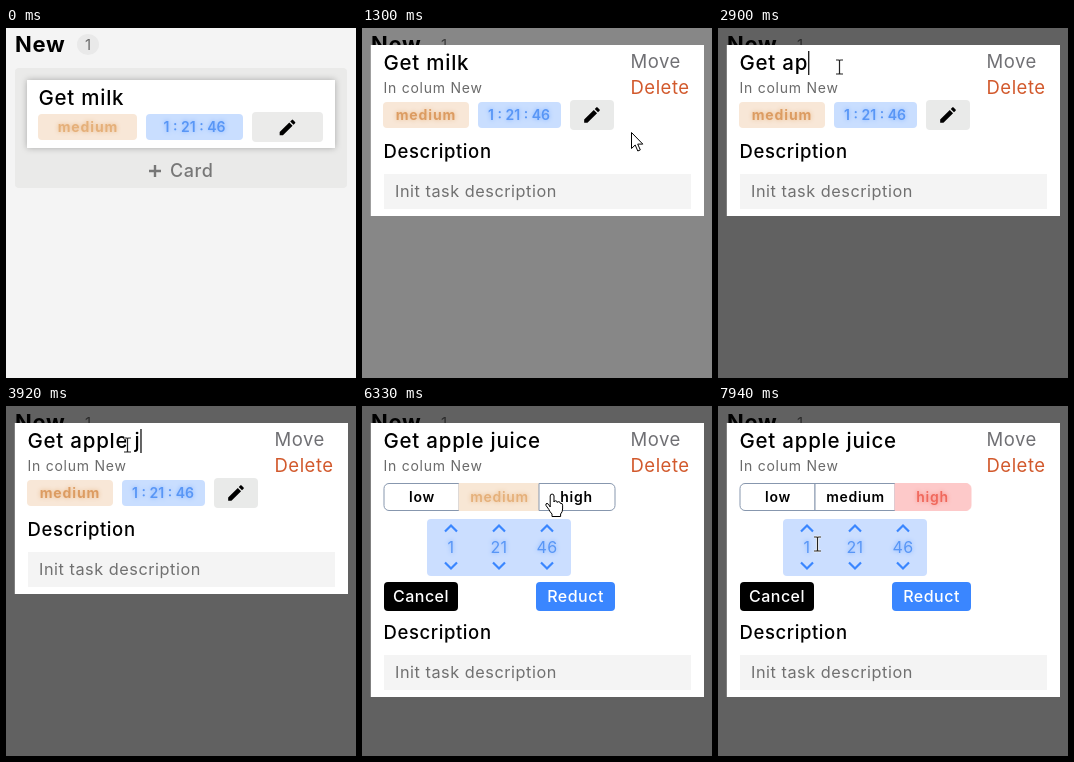
Write an HTML page that moves like this. It is 350x350 px and loops after 8000 ms.

```html
<!DOCTYPE html>
<html lang="en">
<head>
<meta charset="utf-8">
<title>Task card</title>
<style>
  html, body { margin: 0; width: 100%; height: 100%; overflow: hidden; background: #f4f4f4; }
  svg { display: block; width: 100vw; height: 100vh; }
  text { font-family: Inter, "Open Sans", sans-serif; white-space: pre; }
  .h { font-size: 20.5px; font-weight: 500; letter-spacing: .75px; }
  .tag { font-size: 14px; font-weight: 700; letter-spacing: .9px; text-anchor: middle; }
  .time { font-size: 14px; font-weight: 600; text-anchor: middle; }
  .seg { font-size: 14px; font-weight: 600; letter-spacing: .7px; text-anchor: middle; }
  .link { font-size: 18.5px; letter-spacing: .5px; }
  .btn { font-size: 16px; font-weight: 500; letter-spacing: .5px; text-anchor: middle; fill: #fff; }
  .num { font-size: 16px; letter-spacing: .3px; text-anchor: middle; }
  .orange { fill: #e5b07a; filter: drop-shadow(0 0 2px #e9b98a); }
  .deep { fill: #dc9c62; filter: drop-shadow(0 0 2px #e9b98a); }
  .blue { fill: #5896f6; filter: drop-shadow(0 0 2px #7fb0ff); }
  .red { fill: #f0685c; filter: drop-shadow(0 0 2px #f58d84); }
  .card { filter: drop-shadow(0 0 3px rgba(0, 0, 0, .28)); }
  .chev { fill: none; stroke: #3a86ff; stroke-width: 2.2; }
  #ring { mix-blend-mode: multiply; }
</style>
</head>
<body>
<svg viewBox="0 0 350 350">
  <defs>
    <path id="pencil" transform="scale(.87) translate(-12 -12)" d="M3 17.25V21h3.75L17.81 9.94l-3.75-3.75zM20.71 7.04a1 1 0 0 0 0-1.41l-2.34-2.34a1 1 0 0 0-1.41 0l-1.83 1.83 3.75 3.75z"/>
    <path id="up" d="M-6 3.5L0-2.5L6 3.5"/>
    <path id="bar" d="M-3.5-7H-1Q0-7 0-6Q0-7 1-7H3.5M0-6V6M-3.5 7H-1Q0 7 0 6Q0 7 1 7H3.5"/>
  </defs>

  <rect width="350" height="350" fill="#f4f4f4"/>
  <text x="9" y="24" font-size="22" font-weight="700" letter-spacing=".7">New</text>
  <ellipse id="badge" cx="82" cy="16.5" rx="11" ry="10.5" fill="#e9e9e9"/>
  <text x="82" y="22" font-size="15" text-anchor="middle" fill="#6c6c6c">1</text>

  <g id="board">
    <rect x="9" y="40" width="332" height="120" rx="4" fill="#eaeae9"/>
    <rect class="card" x="21" y="52" width="308" height="68" fill="#fff"/>
    <text class="h" x="32.5" y="77">Get milk</text>
    <rect x="32" y="86" width="99" height="26" rx="4" fill="#f8e7d7"/>
    <text class="tag orange" x="82" y="104">medium</text>
    <rect x="140" y="86" width="97" height="26" rx="4" fill="#c9deff"/>
    <text class="time blue" x="188.5" y="104">1 : 21 : 46</text>
    <rect x="246" y="84" width="71" height="30" rx="4" fill="#ebebea"/>
    <use href="#pencil" transform="translate(281.5 99.5)"/>
    <path d="M143 143h12M149 137v12" stroke="#777" stroke-width="2.4"/>
    <text x="164" y="149" font-size="18" font-weight="500" letter-spacing=".6" fill="#777">Card</text>
  </g>

  <rect id="shade" width="350" height="350"/>

  <g id="modal">
    <rect id="sheet" x="8.8" y="17" width="333.2" height="171" fill="#fff"/>
    <rect id="mark" y="23" height="24" fill="#3390ff"/>
    <text id="title" class="h" x="21.5" y="42"><tspan>Get </tspan><tspan id="word">milk</tspan></text>
    <text x="21.5" y="65" font-size="14" letter-spacing=".75" fill="#6a6a6a">In colum New</text>
    <text class="link" x="268.5" y="40" fill="#707074">Move</text>
    <text class="link" x="268.5" y="66" fill="#d2592c">Delete</text>

    <g id="tags">
      <rect x="21" y="74" width="86" height="26" rx="4" fill="#f8e7d7"/>
      <text class="tag deep" x="64" y="92">medium</text>
      <rect x="116" y="74" width="83" height="26" rx="4" fill="#c9deff"/>
      <text class="time blue" x="157" y="92">1 : 21 : 46</text>
      <rect x="208" y="72" width="44" height="30" rx="4" fill="#e9eae9"/>
      <use href="#pencil" transform="translate(230 87)"/>
    </g>

    <g id="editor">
      <path d="M97 77.5H27a5 5 0 0 0-5 5v17a5 5 0 0 0 5 5H97z" fill="#fff" stroke="#8797ae"/>
      <path id="midBox" d="M97 77.5h80v27H97z"/>
      <path id="highBox" d="M177 77.5h71a5 5 0 0 1 5 5v17a5 5 0 0 1-5 5H177z"/>
      <text class="seg" x="60" y="96">low</text>
      <text id="mid" x="137.5" y="96">medium</text>
      <text id="high" x="214.5" y="96">high</text>
      <rect x="65" y="113" width="144" height="57" rx="4" fill="#cbdeff"/>
      <g id="nums"></g>
      <rect x="22" y="176" width="74" height="29" rx="4"/>
      <text class="btn" x="59" y="196">Cancel</text>
      <rect x="174" y="176" width="79" height="29" rx="4" fill="#3a86ff"/>
      <text class="btn" x="213.5" y="196">Reduct</text>
    </g>

    <g id="desc">
      <text x="21.5" y="130" font-size="18.5" font-weight="500" letter-spacing=".6">Description</text>
      <rect x="22" y="146" width="307" height="35" fill="#f4f4f4"/>
      <text x="33" y="169" font-size="16.3" letter-spacing=".53" fill="#707070">Init task description</text>
    </g>
    <rect id="caret" width="1.2"/>
  </g>

  <circle id="ring" r="11.5" fill="#fff64e"/>
  <g id="cursor">
    <path id="arrow" d="M.5.5v16l3.7-3.5 2.6 6 2.5-1.1-2.6-5.8h5.1z" fill="#fff" stroke="#000"/>
    <path id="hand" d="M-1.8 13V2a1.9 1.9 0 0 1 3.8 0V8q0-1.4 1.7-1.2 1.6.2 1.6 1.7 0-1 1.5-.8 1.6.2 1.6 1.7 2.2-.6 2.2 1.8V15q0 3-2 5v2.5H0V20q-2-2-3.2-4.6L-6 11.5q-.6-2 1-2.2 1.2 0 3.2 3.7z" fill="#fff" stroke="#000" stroke-linejoin="round"/>
    <g id="beam" fill="none">
      <use href="#bar" stroke="#fff" stroke-width="2.6"/>
      <use href="#bar" stroke="#222" stroke-width="1.2"/>
    </g>
  </g>
</svg>
<script>
  const $ = id => document.getElementById(id);
  const set = (el, attrs) => { for (const k in attrs) el.setAttribute(k, attrs[k]); };
  const show = (id, on) => { $(id).style.display = on ? '' : 'none'; };
  const within = (t, a, b) => t >= a && t < b;
  const clamp = v => Math.max(0, Math.min(1, v));
  const ease = v => v * v * (3 - 2 * v);

  const LOOP = 8000, OPEN = 1100, EDIT = 5730, PICK = 6430;
  const TYPED = 'apple juice';
  const KEYS = [2800, 2900, 3000, 3220, 3320, 3520, 3920, 4020, 4320, 4520, 4620];

  // Pointer stops: time, x, y
  const PATH = [
    [180, 281, 335], [560, 256, 160], [800, 269, 104], [1350, 269, 104],
    [1700, 121.5, 39], [5180, 121.5, 39], [5560, 230, 92], [5880, 230, 92],
    [6300, 190, 88], [6580, 190, 88], [6780, 201, 112], [7130, 99.5, 138]
  ];
  // Clicks: start, end, x, y
  const CLICKS = [
    [1000, 1100, 269, 104], [1900, 2100, 120.5, 38.5], [5630, 5830, 229, 92],
    [6430, 6530, 190, 88], [7330, 7430, 97.5, 138]
  ];

  $('nums').innerHTML = [[89, 1], [137, 21], [185, 46]].map(([x, n]) => `
    <use href="#up" class="chev" transform="translate(${x} 122)"/>
    <text class="num blue" x="${x}" y="147">${n}</text>
    <use href="#up" class="chev" transform="translate(${x} 160) scale(1 -1)"/>`).join('');

  function pointer(t) {
    let i = 0;
    while (i < PATH.length - 1 && t >= PATH[i + 1][0]) i++;
    const a = PATH[i], b = PATH[i + 1] || a;
    const p = b === a ? 0 : ease(clamp((t - a[0]) / (b[0] - a[0])));
    return [a[1] + (b[1] - a[1]) * p, a[2] + (b[2] - a[2]) * p];
  }

  function pointerKind(t, x, y) {
    if (t < OPEN) return y < 160 ? 'hand' : 'arrow';
    if (x < 260 && y > 20 && y < 48) return 'beam';
    if (t < EDIT) return x > 207 && x < 253 && y > 71 && y < 103 ? 'hand' : 'arrow';
    if (y > 76 && y < 106) return 'hand';
    return y > 130 && y < 152 && x < 104 ? 'beam' : 'arrow';
  }

  function segment(name, on, tint, fill) {
    set($(name + 'Box'), { fill: on ? fill : '#fff', stroke: on ? fill : '#8797ae' });
    $(name).setAttribute('class', on ? 'seg ' + tint : 'seg');
  }

  function drawTitle(t) {
    const count = KEYS.filter(k => t >= k).length;
    const word = count ? TYPED.slice(0, count) : 'milk';
    const selected = within(t, 2000, KEYS[0]);
    if ($('word').textContent !== word) $('word').textContent = word;
    $('word').setAttribute('fill', selected ? '#fff' : '#000');
    show('mark', selected);
    const end = 21.5 + $('title').getComputedTextLength();
    if (selected) {
      const x = $('title').getStartPositionOfChar(4).x;
      set($('mark'), { x, width: end - x });
    }
    const typing = within(t, 1900, 2000) || within(t, KEYS[0], 5120);
    const counting = within(t, 7430, 7940);
    show('caret', typing || counting);
    set($('caret'), counting ? { x: 90.8, y: 132, height: 19 } : { x: end, y: 23, height: 24 });
  }

  function draw(t) {
    const open = t >= OPEN, edit = t >= EDIT;
    show('board', !open);
    show('badge', !open);
    show('modal', open);
    set($('shade'), { opacity: .6 * clamp((t - OPEN) / 270) });

    if (open) {
      show('tags', !edit);
      show('editor', edit);
      set($('sheet'), { height: edit ? 274 : 171 });
      set($('desc'), { transform: `translate(0 ${edit ? 103 : 0})` });
      segment('mid', t < PICK, 'orange', '#f8e7d5');
      segment('high', t >= PICK, 'red', '#fdc9c9');
      drawTitle(t);
    }

    const click = CLICKS.find(c => within(t, c[0], c[1]));
    show('ring', click);
    if (click) set($('ring'), { cx: click[2], cy: click[3] });

    const [x, y] = pointer(t), kind = pointerKind(t, x, y);
    show('cursor', t >= 180);
    set($('cursor'), { transform: `translate(${x.toFixed(2)} ${y.toFixed(2)})` });
    for (const k of ['arrow', 'hand', 'beam']) show(k, k === kind);
  }

  const start = performance.now();
  function tick() {
    draw((performance.now() - start) % LOOP);
    requestAnimationFrame(tick);
  }
  tick();
</script>
</body>
</html>
```
